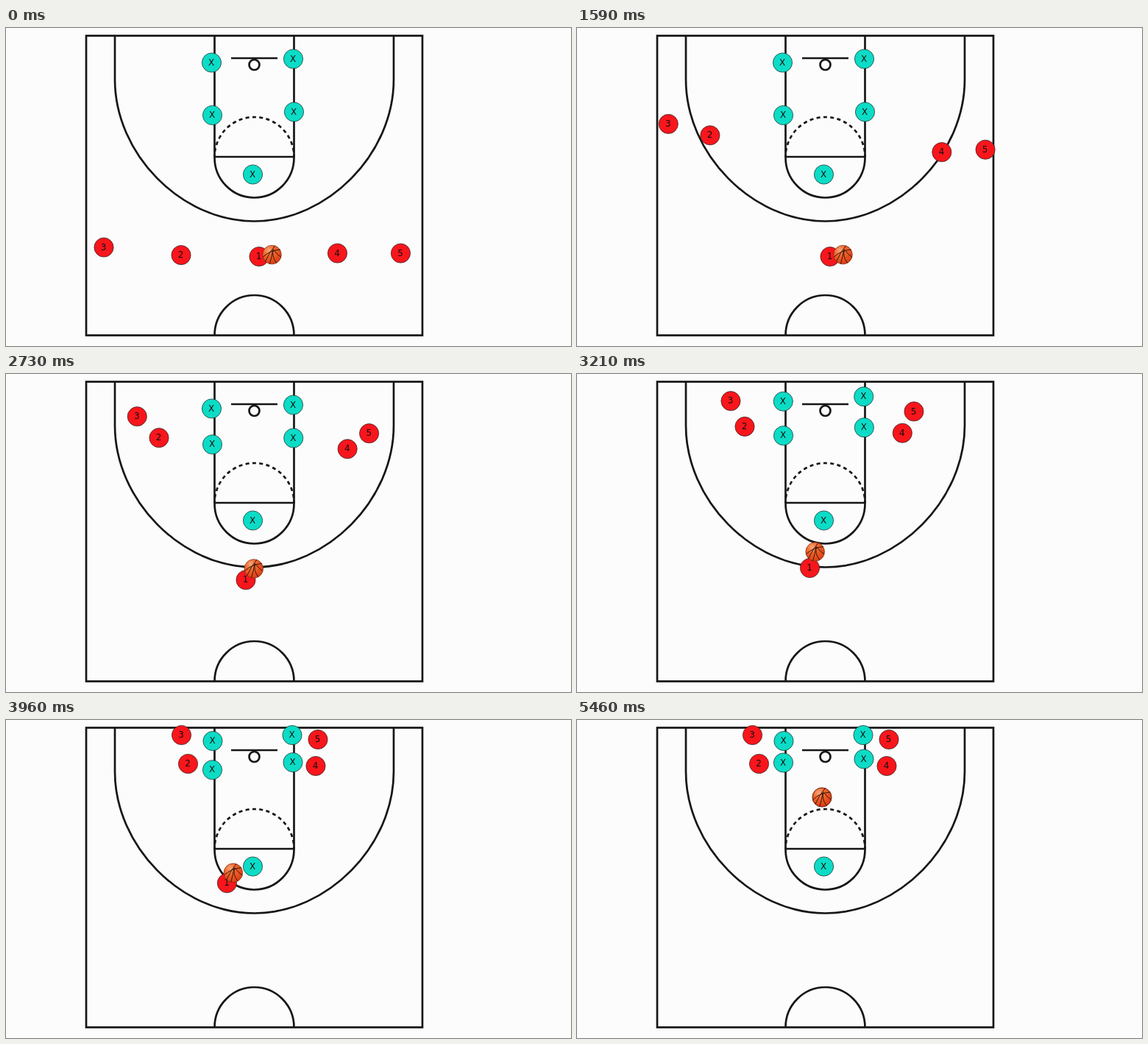
An HTML page that plays this animation: 768 px wide and 432 px high, repeating every 5490 ms.

```html
<!DOCTYPE html>
<html lang="en">
<head>
<meta charset="utf-8">
<title>Basketball play</title>
<style>
  html, body { margin: 0; width: 100%; height: 100%; overflow: hidden; background: #fcfcfc; }
  svg { display: block; width: 768px; height: 432px; }
  .court { fill: none; stroke: #161616; stroke-width: 2.7; }
  .token circle { stroke: #222; stroke-width: 0.7; }
  .token text { font: 12px "DejaVu Sans", Verdana, sans-serif; text-anchor: middle; fill: #111; }
  .seams { fill: none; stroke: #3a1206; stroke-width: 1; stroke-linecap: round; }
</style>
</head>
<body>
<svg viewBox="0 0 768 432">
  <defs>
    <radialGradient id="skin" cx="34%" cy="26%" r="78%">
      <stop offset="0" stop-color="#f6a878"/>
      <stop offset="0.4" stop-color="#f0652c"/>
      <stop offset="1" stop-color="#d83c14"/>
    </radialGradient>
  </defs>
  <g class="court">
    <rect x="109" y="10.5" width="457" height="407"/>
    <path d="M148 10.5V70C148 171 238 262.5 337.5 262.5S527 171 527 70V10.5"/>
    <path d="M283.5 10.5V176A54 54.5 0 0 0 391.5 176V10.5M283.5 175H391.5"/>
    <path d="M283.5 175A54 54 0 0 1 391.5 175" stroke-dasharray="5 4.4" stroke-dashoffset="2.5"/>
    <path d="M283.5 417.5A54 54.5 0 0 1 391.5 417.5"/>
    <path d="M306 41H369"/>
    <circle cx="337.5" cy="50" r="7"/>
  </g>
  <g id="tokens"></g>
  <g id="ball">
    <circle r="12.8" fill="url(#skin)" stroke="#7a2a10" stroke-width="0.7"/>
    <path class="seams" d="M-12 3Q-3 -6 11 -7M-9 9Q-3 -4 4 -12M-3 12Q0 2 1 -6M6 11Q-1 2 2 -7M12 3Q6 -1 3 -6"/>
  </g>
</svg>
<script>
const LOOP = 5490, STEP = 30, BEAT = 910;
const RED = '#f8161c', TEAL = '#0cdcc6';
const SVG = 'http://www.w3.org/2000/svg';
const layer = document.getElementById('tokens');
const movers = [];

// A move runs from one beat to another towards a point; bend bows it sideways.
const move = (from, to, end, bend = 0) => ({ from, to, end, bend });

function bow([x0, y0], [x1, y1], bend, f) {
  const dx = x1 - x0, dy = y1 - y0;
  const side = 2 * f * (1 - f) * bend / Math.hypot(dx, dy);
  return [x0 + dx * f + dy * side, y0 + dy * f - dx * side];
}

function locate({ start, moves }, beat) {
  let at = start;
  for (const { from, to, end, bend } of moves) {
    if (beat <= from) break;
    at = bow(at, end, bend, Math.min(1, (beat - from) / (to - from)));
  }
  return at;
}

function add(parent, tag, attrs) {
  const el = document.createElementNS(SVG, tag);
  for (const k in attrs) el.setAttribute(k, attrs[k]);
  return parent.appendChild(el);
}

function token(label, fill, start, ...moves) {
  const el = add(layer, 'g', { class: 'token' });
  add(el, 'circle', { r: 13.1, fill });
  add(el, 'text', { x: -0.4, y: 3.6 }).textContent = label;
  movers.push({ el, start, moves });
}

// Defenders: the front pair drops first, the back pair follows.
const back = (start, end) => token('X', TEAL, start, move(3, 4, end));
const front = (start, mid, end) => token('X', TEAL, start, move(2, 4, mid), move(4, 5, end));
back([279.5, 47], [281, 28.5]);
back([390.5, 42], [389, 20.5]);
front([280.5, 118.5], [280.5, 73], [280.5, 58]);
front([391.5, 114], [390, 60], [390, 53]);
token('X', TEAL, [335.5, 199]);

// Runners go up to the wing, then cut in to the post.
const runner = (label, start, wing, post, bend) =>
  token(label, RED, start, move(0, 2, wing, bend), move(2, 4, post, bend));
runner('3', [133, 298], [126.5, 106], [238.5, 20.5], 14);
runner('2', [238, 308.5], [175, 121.5], [247.5, 59.5], 10);
runner('4', [450.5, 306], [500, 148], [421, 62.5], -10);
runner('5', [536.5, 306], [554.5, 144.5], [424, 26.5], -13);

// The dribbler walks up and drives round the middle defender.
token('1', RED, [344, 310.5], move(2, 4, [308, 249]), move(4, 6, [333, 105], 42));

// The ball is dribbled, shot at the hoop and drops.
movers.push({
  el: document.getElementById('ball'),
  start: [361.5, 308],
  moves: [move(2, 4, [312, 221]), move(4, 5, [303, 183]),
          move(5, 5.7, [340, 56]), move(5.7, 6, [333, 105])]
});

function draw(t) {
  for (const m of movers) {
    const [x, y] = locate(m, t / BEAT);
    m.el.setAttribute('transform', `translate(${x.toFixed(2)} ${y.toFixed(2)})`);
  }
}

const begin = performance.now();
function tick() {
  const t = (performance.now() - begin) % LOOP;
  draw(Math.floor(t / STEP) * STEP);
  requestAnimationFrame(tick);
}
tick();
</script>
</body>
</html>
```
